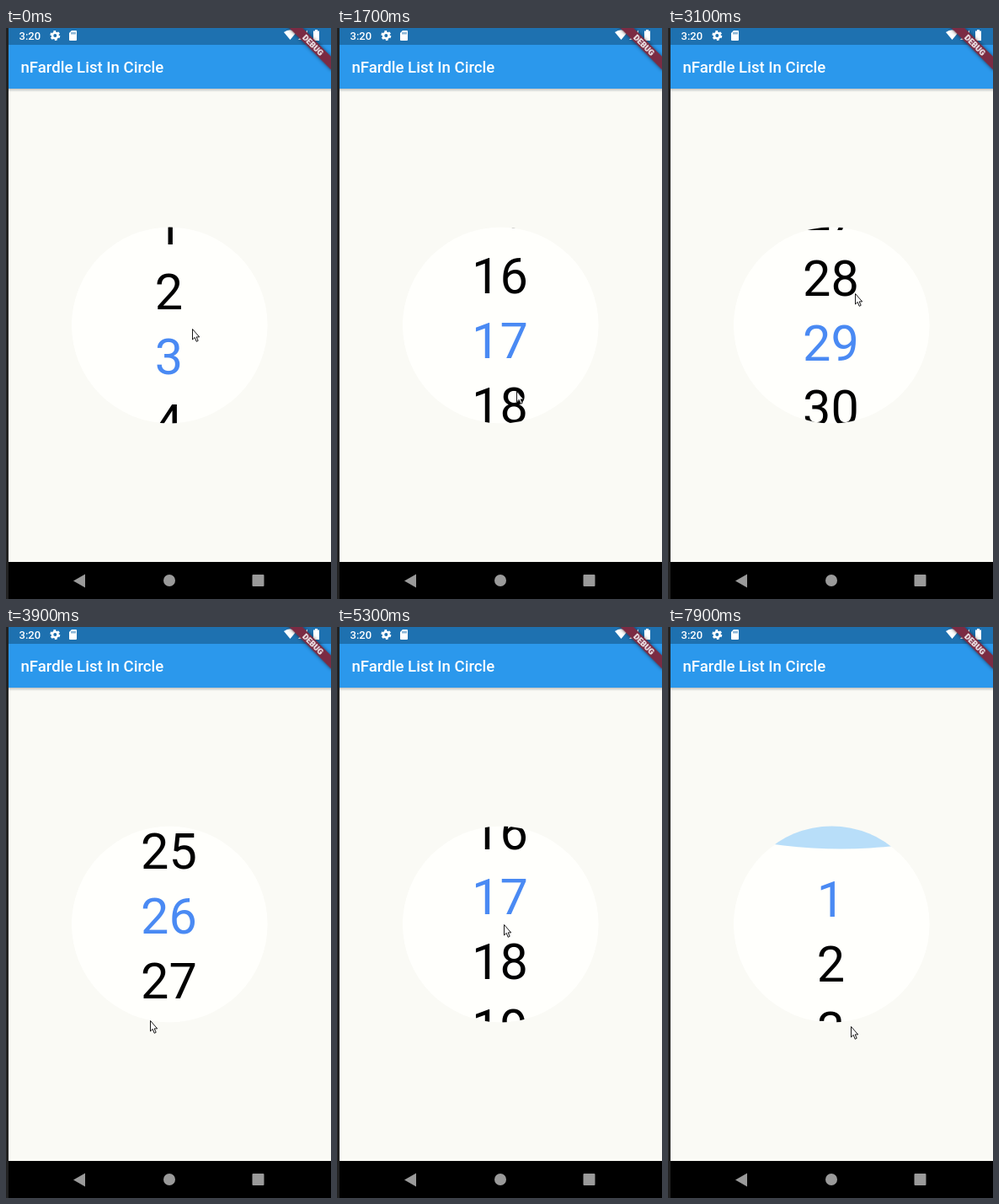
Recreate the animation shown at these times as an HTML page. Size 386x678 px, loop 8000 ms.

```html
<!DOCTYPE html>
<html lang="en">
<head>
<meta charset="utf-8">
<title>List in circle</title>
<style>
html, body { margin: 0; width: 100%; height: 100%; overflow: hidden; }
svg { display: block; width: 386px; height: 678px; font-family: Roboto, sans-serif; }
#list { font-size: 59.4px; text-anchor: middle; }
.debug { filter: drop-shadow(0 0 2px #0008); }
</style>
</head>
<body>
<svg viewBox="0 0 386 678">
  <defs>
    <clipPath id="round"><circle cx="194.3" cy="353" r="116.5"/></clipPath>
    <linearGradient id="shade" x2="0" y2="1">
      <stop stop-color="#000" stop-opacity=".22"/>
      <stop offset="1" stop-color="#000" stop-opacity="0"/>
    </linearGradient>
  </defs>
  <rect width="386" height="678" fill="#fafaf5"/>
  <rect y="72" width="386" height="4" fill="url(#shade)"/>
  <rect y="20" width="386" height="52" fill="#2b98ec"/>
  <rect width="386" height="20" fill="#1e71b0"/>
  <text x="17.5" y="53" font-size="18.6" font-weight="500" fill="#fff">nFardle List In Circle</text>

  <g fill="#fff">
    <text x="15.5" y="14" font-size="13" font-weight="500">3:20</text>
    <g fill="none" stroke="#fff">
      <circle cx="58.3" cy="9" r="3.3" stroke-width="2.6"/>
      <circle cx="58.3" cy="9" r="5" stroke-width="2" stroke-dasharray="2.8 2.436"/>
    </g>
    <path d="M78 3h5q1 0 1 1v10q0 1-1 1h-7q-1 0-1-1V6z"/>
    <path d="M78 5v2.5M80 5v2.5M82 5v2.5" stroke="#1e71b0"/>
    <path d="M330 5q7.5-5.5 15 0l-7.5 9z"/>
    <path d="M358 2.5v11.500h-11z"/>
    <path d="M367 2h3v1.500h2V15h-7V3.500h2z"/>
  </g>

  <g class="debug" transform="translate(387 -2) rotate(45)">
    <rect x="-37.3" y="26" width="74.6" height="11.2" fill="#7b2b43"/>
    <text y="35" font-size="9.5" font-weight="900" fill="#fff" text-anchor="middle">DEBUG</text>
  </g>

  <rect y="634" width="386" height="44"/>
  <g fill="#9a9a9a">
    <path d="M80 656.500l14-8v16z"/>
    <circle cx="194" cy="656" r="7"/>
    <rect x="292.500" y="649" width="14" height="14" rx="1"/>
  </g>
  <rect width="3" height="678" fill="#222"/>

  <g clip-path="url(#round)">
    <circle cx="194.3" cy="353" r="116.5" fill="#fffffc"/>
    <g id="list"></g>
    <ellipse id="glow" rx="349.5" fill="#2196f3"/>
  </g>
  <path id="cursor" d="M.5.5v12.500l2.700-2.600 2 4.900 2-1-2-4.400h3.500z" fill="#fff" stroke="#000" stroke-width=".9"/>
</svg>
<script>
const LOOP = 8000, STEP = 100, PITCH = 77.3;
const $ = id => document.getElementById(id);
const list = $('list'), glow = $('glow'), cursor = $('cursor');

const rows = Array.from({ length: 5 }, () => {
  const row = document.createElementNS('http://www.w3.org/2000/svg', 'text');
  row.setAttribute('x', 193.5);
  return list.appendChild(row);
});

const clamp = (v, lo, hi) => Math.min(hi, Math.max(lo, v));
const progress = (t, start, end) => clamp((t - start) / (end - start), 0, 1);
const fling = u => (3.065 * u - 3.27 * u * u + 1.2 * u ** 3) / 0.995;

// Pointer moves; one with a coast holds the list, then lets it run on for some rows.
const move = (start, end, x, y, coast, coastTime) => ({ start, end, x, y, coast, coastTime });
const moves = [
  move(200, 300, 204, 399),
  move(400, 900, 243, 201, 11.69, 800),
  move(1100, 1700, 213, 431),
  move(1800, 2300, 229, 153, 8.66, 1100),
  move(2400, 2900, 222, 315),
  move(3100, 3400, 212, 243),
  move(3500, 4000, 155, 556, -7.55, 1000),
  move(4400, 5000, 157, 542),
  move(5100, 5300, 198, 353),
  move(5400, 5600, 212, 491, -16, 600),
  move(6400, 6500, 237, 553),
  move(6600, 6800, 215, 402),
  move(7000, 7500, 224, 649, 0, 100),
  move(7600, 7900, 217, 474)
];

function poseAt(t) {
  let x = 221, y = 357, offset = 1.129;
  for (const m of moves) {
    const held = m.coast !== undefined;
    const u = progress(t, m.start, m.end) ** (held ? 1.5 : 1);
    const dy = (m.y - y) * u;
    x += (m.x - x) * u;
    y += dy;
    if (held) {
      const run = fling(progress(t, m.end, m.end + m.coastTime));
      offset = Math.max(0, offset - dy / PITCH + m.coast * run);
    }
  }
  return { x, y, offset };
}

// The glow swells when the list hits its top, then fades.
const swell = (t, start, peak, end) => progress(t, start, peak) * (1 - progress(t, peak, end));

function set(el, attrs) {
  for (const name in attrs) el.setAttribute(name, attrs[name]);
}

function draw(now) {
  const t = Math.floor(now % LOOP / STEP) * STEP;
  const { x, y, offset } = poseAt(t);
  const picked = Math.floor(offset * 0.9945 + 1.892);
  rows.forEach((row, i) => {
    const n = Math.floor(offset) + i;
    row.textContent = n > 0 ? n : '';
    set(row, {
      y: 344 + (n - 1 - offset) * PITCH,
      fill: n === picked ? '#4a8af3' : '#000'
    });
  });

  set(cursor, {
    transform: `translate(${Math.round(x)} ${Math.round(y)})`,
    visibility: t >= 5900 && t < 6500 ? 'hidden' : 'visible'
  });

  const level = swell(t, 5900, 6000, 6300) + swell(t, 7000, 7500, 8680);
  const scale = 0.87 * level;
  set(glow, {
    cx: 97.2 + x / 2,
    cy: 236.5 - 302.7 * scale,
    ry: 349.5 * scale,
    opacity: 0.48 * level
  });
}

const began = performance.now();
function tick() {
  draw(performance.now() - began);
  requestAnimationFrame(tick);
}
tick();
</script>
</body>
</html>
```
